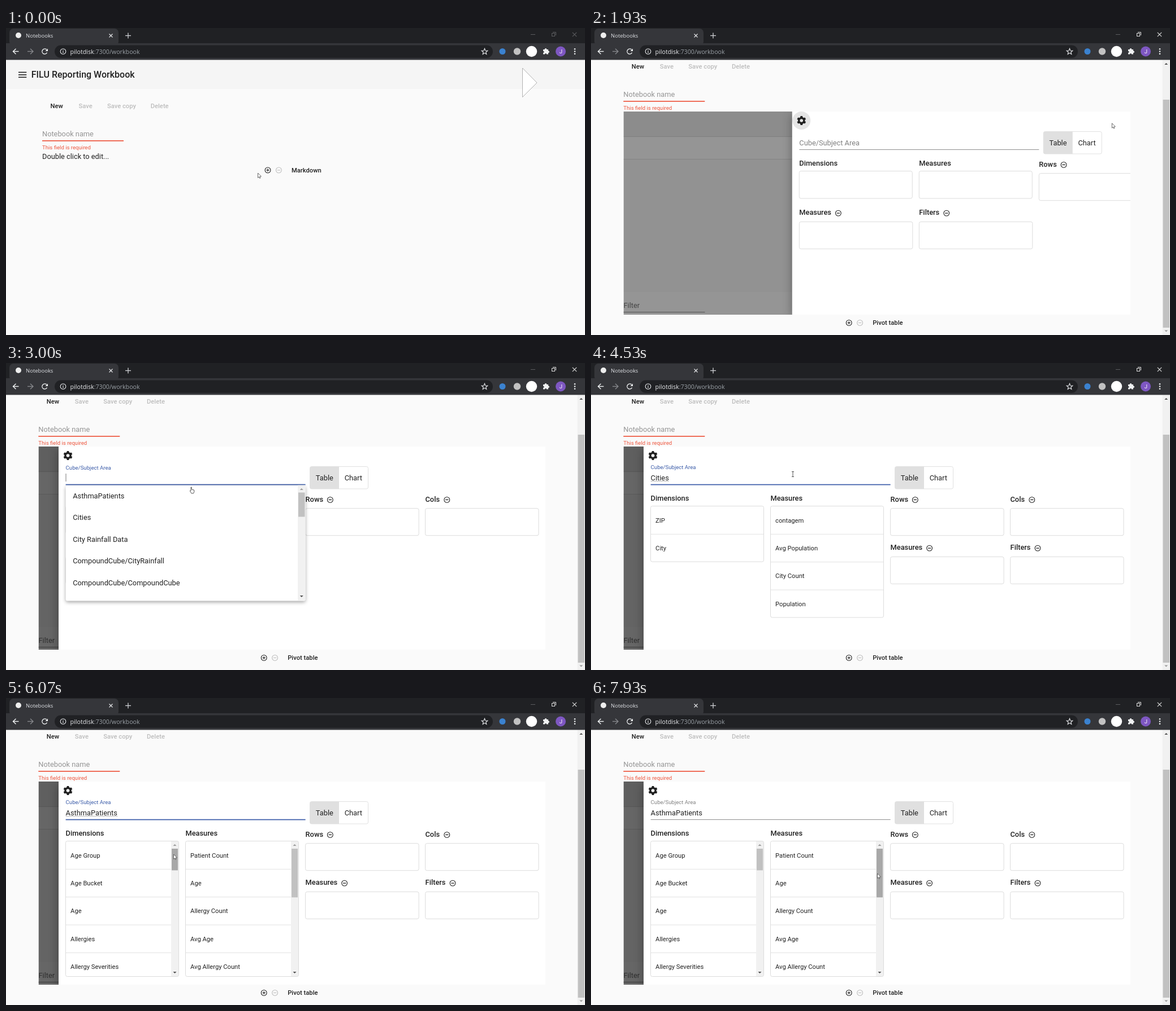
These frames come from a looping animation (1024 px wide and 544 px high, 8 s). An HTML page with a canvas:

```html
<!DOCTYPE html>
<html lang="en">
<head>
<meta charset="utf-8">
<title>Notebooks</title>
<style>
html, body { margin: 0; width: 100%; height: 100%; overflow: hidden; background: #fafafa; }
canvas { display: block; }
</style>
</head>
<body>
<canvas id="stage" width="1024" height="544"></canvas>
<script>
const c = document.getElementById('stage').getContext('2d');
const LOOP = 8000;
const INK = '#212121', GREY = '#bdbdbd', MID = '#7c7c7c', RED = '#ee563e', BLUE = '#3a5ba8';
const UI = '"Open Sans"';

// Moments of the clicks
const MENU_OPEN = 570, PIVOT = 920, DRAWER = 1834, FOCUS = 2700, PICK_CITY = 3400,
      REOPEN = 4700, PICK_ASTHMA = 5190, LISTS = 5270, BLUR = 6130, RELEASE = 7350;

const CUBES = ['AsthmaPatients', 'Cities', 'City Rainfall Data', 'CompoundCube/CityRainfall', 'CompoundCube/CompoundCube'];
const DATA = {
  none: [[], []],
  city: [['ZIP', 'City'], ['contagem', 'Avg Population', 'City Count', 'Population']],
  asthma: [
    ['Age Group', 'Age Bucket', 'Age', 'Allergies', 'Allergy Severities', 'Birth Decade', 'Birth Year', 'Birth Quarter',
     'Birth Month', 'City', 'Diagnoses', 'Diagnosis Year', 'Doctor', 'Doctor Group', 'Gender', 'Home City', 'Profession',
     'Industry', 'Patient Group', 'Primary Care', 'Relative', 'Region', 'Status', 'Test Score', 'Visit', 'Year', 'ZIP'],
    ['Patient Count', 'Age', 'Allergy Count', 'Avg Age', 'Avg Allergy Count', 'Avg Test Score', 'Encounter Count',
     'Max Age', 'Min Age', 'Population', 'Test Score', 'Visit Count']
  ]
};

// Pointer route: time, x, y
const ROUTE = [
  [0, 445, 257], [150, 445, 257], [500, 520, 252], [620, 520, 252], [830, 525, 319], [940, 525, 319],
  [1400, 809, 283], [1700, 935, 165], [1850, 935, 166], [2070, 889, 175], [2600, 330, 204], [2740, 330, 205],
  [3000, 326, 220], [3260, 300, 270], [3450, 300, 272], [3950, 352, 199], [4530, 357, 197], [4760, 357, 200],
  [5080, 310, 236], [5220, 310, 236], [5800, 296, 277], [6150, 296, 277], [6800, 298, 377], [6900, 298, 377],
  [7300, 297, 277], [7420, 297, 277], [7820, 506, 311], [8000, 506, 311]
];

const clamp = v => Math.max(0, Math.min(1, v));
const ramp = (t, from, to) => { const p = clamp((t - from) / (to - from)); return p * p * (3 - 2 * p); };

// cubic-bezier(.25, .8, .25, 1)
function swift(p) {
  let lo = 0, hi = 1, s = .5;
  for (let i = 0; i < 20; i++) {
    s = (lo + hi) / 2;
    if (.75 * s * (1 - s) + s ** 3 < p) lo = s; else hi = s;
  }
  return 2.4 * s * (1 - s) ** 2 + 3 * s * s * (1 - s) + s ** 3;
}

function pointer(t) {
  const i = Math.max(1, ROUTE.findIndex(k => k[0] > t));
  const [a, b] = [ROUTE[i - 1], ROUTE[i]], p = ramp(t, a[0], b[0]);
  return [a[1] + (b[1] - a[1]) * p, a[2] + (b[2] - a[2]) * p];
}

// Text is placed by its left edge and the middle of its capitals
function text(s, x, y, size = 12.8, color = INK, weight = 400, font = 'Roboto') {
  c.font = `${weight} ${size}px ${font}, sans-serif`;
  c.fillStyle = color;
  c.fillText(s, x, y + size * .355);
}
function rect(x, y, w, h, color) { c.fillStyle = color; c.fillRect(x, y, w, h); }
function round(x, y, w, h, r, fill, stroke) {
  c.beginPath(); c.roundRect(x, y, w, h, r);
  if (fill) { c.fillStyle = fill; c.fill(); }
  if (stroke) { c.strokeStyle = stroke; c.lineWidth = 1; c.stroke(); }
}
function line(pts, color, width = 1) {
  c.beginPath();
  for (let i = 0; i < pts.length; i += 2) c.lineTo(pts[i], pts[i + 1]);
  c.strokeStyle = color; c.lineWidth = width; c.stroke();
}
function poly(pts, fill, stroke, width = .8) {
  c.beginPath();
  for (let i = 0; i < pts.length; i += 2) c.lineTo(pts[i], pts[i + 1]);
  c.closePath();
  c.fillStyle = fill; c.fill();
  if (stroke) { c.strokeStyle = stroke; c.lineWidth = width; c.stroke(); }
}
function disc(x, y, r, color) { c.beginPath(); c.arc(x, y, r, 0, 7); c.fillStyle = color; c.fill(); }
function ring(x, y, r, color, width = 1.1, from = 0, to = 2 * Math.PI) {
  c.beginPath(); c.arc(x, y, r, from, to); c.strokeStyle = color; c.lineWidth = width; c.stroke();
}
function sign(x, y, color, plus) {
  ring(x, y, 4.9, color);
  line([x - 2.7, y, x + 2.7, y], color, 1.1);
  if (plus) line([x, y - 2.7, x, y + 2.7], color, 1.1);
}
function shadowed(x, y, w, h, blur, dy, alpha) {
  c.save();
  c.shadowColor = `rgba(0,0,0,${alpha})`; c.shadowBlur = blur; c.shadowOffsetY = dy;
  round(x, y, w, h, 3, '#fff');
  c.restore();
}
function gear(x, y) {
  ring(x, y, 4.5, INK, 3.4);
  for (let i = 0; i < 6; i++) {
    c.save(); c.translate(x, y); c.rotate(i * Math.PI / 3);
    poly([-2.4, -5, -1.7, -8, 1.7, -8, 2.4, -5], INK);
    c.restore();
  }
}
function scrollbar(x, y, w, h, thumbY, thumbH, dark) {
  rect(x, y, w, h, '#f1f1f1');
  rect(x + 1, thumbY, w - 2, thumbH, dark ? '#a8a8a8' : '#c1c1c1');
  const m = x + w / 2, top = y + 7, end = y + h - 7;
  poly([m - 3, top + 1.5, m + 3, top + 1.5, m, top - 1.5], thumbY <= y + 14 ? '#9a9a9a' : '#505050');
  poly([m - 3, end - 1.5, m + 3, end - 1.5, m, end + 1.5], thumbY + thumbH >= y + h - 14 ? '#9a9a9a' : '#505050');
}

function browser(t) {
  rect(0, 0, 1024, 56.5, '#35363a');
  rect(0, 0, 1024, 27, '#202124');
  round(6, 1, 193, 30, 7, '#35363a');
  disc(22, 13, 5, '#eee');
  text('Notebooks', 35, 13.3, 9.5, '#dfe1e5', 400, UI);
  const cross = (x, y, r, color) => { line([x - r, y - r, x + r, y + r], color, 1.1); line([x - r, y + r, x + r, y - r], color, 1.1); };
  cross(185.5, 13.5, 3, '#e8eaed');
  line([211, 13.5, 221, 13.5], '#d0d2d5', 1.3);
  line([216, 8.5, 216, 18.5], '#d0d2d5', 1.3);

  const ctl = t < 200 ? '#5c5d60' : '#e0e0e0';
  line([928, 11.5, 936, 11.5], '#5c5d60');
  c.strokeStyle = ctl; c.lineWidth = 1;
  c.strokeRect(965.5, 9.5, 5, 5);
  line([967, 7.5, 972.5, 7.5, 972.5, 13], ctl);
  cross(1005.5, 11.5, 3.7, ctl);

  const arrow = (x, d, color) => {
    line([x - 5 * d, 41.5, x + 5 * d, 41.5], color, 1.4);
    line([x, 36.7, x - 5 * d, 41.5, x, 46.3], color, 1.4);
  };
  arrow(17.5, 1, '#f1f3f4');
  arrow(43, -1, '#85878b');
  ring(68.5, 41.5, 4.6, '#f1f3f4', 1.4, .5, 5.5);
  poly([74, 36.5, 74, 41, 69.5, 41], '#f1f3f4');

  round(86, 30.5, 775, 22.5, 11.2, '#202124');
  ring(101, 41.5, 4.8, '#e8eaed');
  rect(100.4, 40.8, 1.2, 3.4, '#e8eaed');
  rect(100.4, 38.6, 1.2, 1.2, '#e8eaed');
  const host = 'pilotdisk';
  text(host, 113.5, 41.8, 10.7, '#e8eaed', 400, UI);
  text(':7300/workbook', 113.5 + c.measureText(host).width, 41.8, 10.7, '#9aa0a6', 400, UI);

  const star = [];
  for (let i = 0; i < 10; i++) {
    const r = i % 2 ? 2.4 : 5.6, a = i * Math.PI / 5;
    star.push(846.5 + r * Math.sin(a), 42 - r * Math.cos(a));
  }
  poly(star, '#202124', '#e8eaed', 1.1);
  disc(878, 41.5, 5.5, '#3b82d0');
  disc(904, 41.5, 6.2, '#c2c2c2');
  disc(929.5, 41.5, 9.7, '#fff');
  rect(950, 38, 9, 8.5, '#f1f3f4');
  disc(954.5, 37.7, 1.8, '#f1f3f4');
  disc(959.2, 42.2, 1.8, '#f1f3f4');
  disc(950.2, 42.4, 1.4, '#35363a');
  disc(954.5, 46.5, 1.4, '#35363a');
  disc(981, 41.5, 9, '#7e57c2');
  text('J', 978.8, 41.5, 9.5, '#fff');
  for (const y of [37.3, 41.5, 45.7]) disc(1006, y, 1.3, '#f1f3f4');
}

function pageHead(dx) {
  rect(0, 56, 1024, 52, '#f5f5f5');
  for (const y of [78.5, 82.9, 87.3]) rect(22, y - .8, 14.3, 1.6, INK);
  text('FILU Reporting Workbook', 44.8, 82.3, 16, INK, 500);
  [['New', 78.5, INK], ['Save', 128.5, GREY], ['Save copy', 179, GREY], ['Delete', 255.7, GREY]]
    .forEach(([s, x, color]) => text(s, x + dx, 138.3, 11.2, color, 500));
  text('Notebook name', 64 + dx, 187, 12.8, '#959595');
  rect(64 + dx, 199, 144, 1.7, RED);
  text('This field is required', 64 + dx, 211.8, 9.6, RED);
}

function cellBar(x, y, label) {
  sign(x, y, INK, true);
  sign(x + 19.4, y, GREY);
  text(label, x + 42, y - .3, 11.2, INK, 500);
}

function tableCard() {
  rect(57.5, 148, 896.5, 44.5, '#efefef');
  rect(57.5, 192, 896.5, 1, '#dadada');
  rect(57.5, 193, 896.5, 39, '#fff');
  rect(57.5, 232, 896.5, 1, '#e0e0e0');
  gear(937, 164);
  rect(57.5, 468, 896.5, 40, '#fff');
  text('Filter', 57.5, 491.3, 12.8, '#757575');
  rect(57.5, 503, 144, 1, '#8c8c8c');
  text('Items per page:', 687, 490.2, 9.6, MID);
  text('5', 759.3, 490.2, 9.6, '#444');
  poly([793, 488, 801.5, 488, 797.2, 492.2], '#6a6a6a');
  rect(759, 499, 45, 1, '#8c8c8c');
  text('0 of 0', 833, 490.2, 9.6, MID);
  line([902, 485.7, 897, 490.5, 902, 495.3], '#a2a2a2', 1.5);
  line([928.7, 485.7, 933.7, 490.5, 928.7, 495.3], '#a2a2a2', 1.5);
}

const BOX = '#dcdcdc', ROW = 49.35;

function list(x, items, drag, hover) {
  const full = items.length * ROW, h = Math.min(full || 48.5, 240), long = full > h;
  round(x, 253.5, 200, h, 3, '#fff');
  if (items.length) {
    const thumb = 213 * h / full, scroll = long ? drag / (213 - thumb) * (full - h) : 0;
    c.save();
    c.beginPath(); c.roundRect(x, 253.5, 200, h, 3); c.clip();
    items.forEach((s, i) => {
      const y = 253.5 + i * ROW - scroll;
      text(s, x + 8.6, y + 25.3, 11.2);
      if (i < items.length - 1) rect(x, y + ROW, 200, 1, '#e2e2e2');
    });
    if (long) scrollbar(x + 186.5, 253.5, 13, 240, 267 + drag, thumb, hover);
    c.restore();
  }
  round(x, 253.5, 200, h, 3, null, BOX);
}

function dropZone(label, x, y, signX) {
  text(label, x, y, 12.8, INK, 500);
  sign(x + signX, y + 1.2, INK);
  round(x, y + 16.5, 200.5, 48, 3, '#fff', BOX);
}

function field(t) {
  const focus = t >= FOCUS && t < BLUR;
  const value = t < PICK_CITY ? '' : t < PICK_ASTHMA ? 'Cities' : 'AsthmaPatients';
  const p = swift(clamp((t - FOCUS) / 400));
  text('Cube/Subject Area', 105.6, 203.7 - 18.7 * p, 12.8 - 3.2 * p, focus ? BLUE : '#808080');
  rect(105.6, focus ? 214.7 : 215, 424, focus ? 1.7 : 1, focus ? BLUE : '#8f8f8f');
  text(value, 105.6, 203.3);
  if (focus && value) {
    const w = c.measureText(value).width;
    c.setLineDash([1, 1]);
    line([106, 209.5, 105.6 + w, 209.5], '#777');
    c.setLineDash([]);
  }
  if (focus && !value && (t - FOCUS) % 1000 < 500) rect(105.6, 196, .8, 14, '#555');
}

function drawer(t, mouseY) {
  const p = swift(clamp((t - DRAWER) / 400));
  c.save();
  c.beginPath(); c.rect(57.5, 148, 896.5, 360); c.clip();
  rect(57.5, 148, 896.5, 360, `rgba(0,0,0,${.6 * p})`);
  c.translate((1 - p) * 861, 0);
  c.save();
  c.shadowColor = 'rgba(0,0,0,.35)'; c.shadowBlur = 16; c.shadowOffsetY = 5;
  rect(93, 148, 900, 360, '#fff');
  c.restore();

  disc(109.5, 164, 16, `rgba(0,0,0,${.1 * (1 - ramp(t, 2600, 2800))})`);
  gear(109.5, 164);
  field(t);

  round(537.5, 183.5, 103, 39.5, 3, '#fff', '#e0e0e0');
  round(537.5, 183.5, 51.5, 39.5, [3, 0, 0, 3], '#e0e0e0');
  text('Table', 547.8, 203.5);
  text('Chart', 598.7, 203.5);

  const key = t < PICK_CITY + 30 ? 'none' : t < LISTS ? 'city' : 'asthma';
  const drag = t > 6150 && t < RELEASE ? Math.max(0, mouseY - 277) : 0;
  text('Dimensions', 105.6, 239.8, 12.8, INK, 500);
  text('Measures', 317.5, 239.8, 12.8, INK, 500);
  list(105.5, DATA[key][0], drag, t > 5780 && t < 7480);
  list(317.5, DATA[key][1], 0, t > 7720);
  dropZone('Rows', 529.6, 241.2, 43.7);
  dropZone('Cols', 741.5, 241.2, 38.3);
  const low = key === 'none' ? 105.6 : 529.6;
  dropZone('Measures', low, 326.9, 69);
  dropZone('Filters', low + 212, 326.9, 48.4);
  c.restore();
}

function options() {
  shadowed(105.6, 217, 424, 204.5, 6, 2.5, .35);
  CUBES.forEach((s, i) => text(s, 118.2, 235.5 + i * 38.4));
  scrollbar(516, 216.5, 13.5, 204, 229.5, 43);
}

function menu() {
  shadowed(491.5, 265, 96, 128, 6, 2, .3);
  ['Markdown', 'Pivot table', 'Table'].forEach((s, i) => text(s, 504.5, 290.6 + i * 38.4, 11.2));
}

function drawPointer(t, x, y, open) {
  if (t > DRAWER && !open && y > 190 && y < 215 && x > 106 && x < 529) {
    line([x - 2, y - 4.5, x + 2, y - 4.5], '#444', .9);
    line([x, y - 4.5, x, y + 4.5], '#444', .9);
    line([x - 2, y + 4.5, x + 2, y + 4.5], '#444', .9);
    return;
  }
  c.save();
  c.translate(x, y);
  const onGear = Math.hypot(x - 937, y - 164) < 14 && t < 1900;
  if (open && y > 217 || onGear || open && t < 3100 && y > 215)
    poly([1, 0, 2.2, 0, 2.4, 4, 6.5, 5, 6.8, 8, 5.6, 11, 2, 11, -.8, 6.5, .2, 5.8, 1, 6.5], '#fff', '#333');
  else
    poly([.5, 0, .5, 8.4, 2.5, 6.8, 3.7, 9.4, 4.9, 8.8, 3.8, 6.3, 6.4, 6], '#fff', '#444');
  c.restore();
}

function draw(t) {
  const pivot = t >= PIVOT, dx = pivot ? -6.7 : 0, scroll = 70 * ramp(t, 1100, 1280);
  const [mx, my] = pointer(t);
  const open = t >= FOCUS && t < PICK_CITY || t >= REOPEN && t < PICK_ASTHMA;
  rect(0, 0, 1024, 544, '#fafafa');
  c.save();
  c.translate(0, -scroll);
  pageHead(dx);
  if (pivot) {
    c.translate(0, 70);
    tableCard();
    if (t >= DRAWER) drawer(t, my);
    cellBar(456.2, 522.4, 'Pivot table');
    if (open) options();
  } else {
    text('Double click to edit...', 64, 227.4);
    cellBar(463, 251.9, 'Markdown');
  }
  c.restore();
  if (t >= MENU_OPEN && t < PIVOT) menu();
  if (pivot) scrollbar(1010.5, 56.5, 13.5, 487.5, 70 + 57 * scroll / 70, 404);
  browser(t);
  if (t < 200) poly([913.5, 71, 939, 97, 913.5, 122.5], '#fff', '#a0a0a0', .8);
  drawPointer(t, mx, my, open);
}

const start = performance.now();
function tick() {
  draw((performance.now() - start) % LOOP);
  requestAnimationFrame(tick);
}
tick();
</script>
</body>
</html>
```
